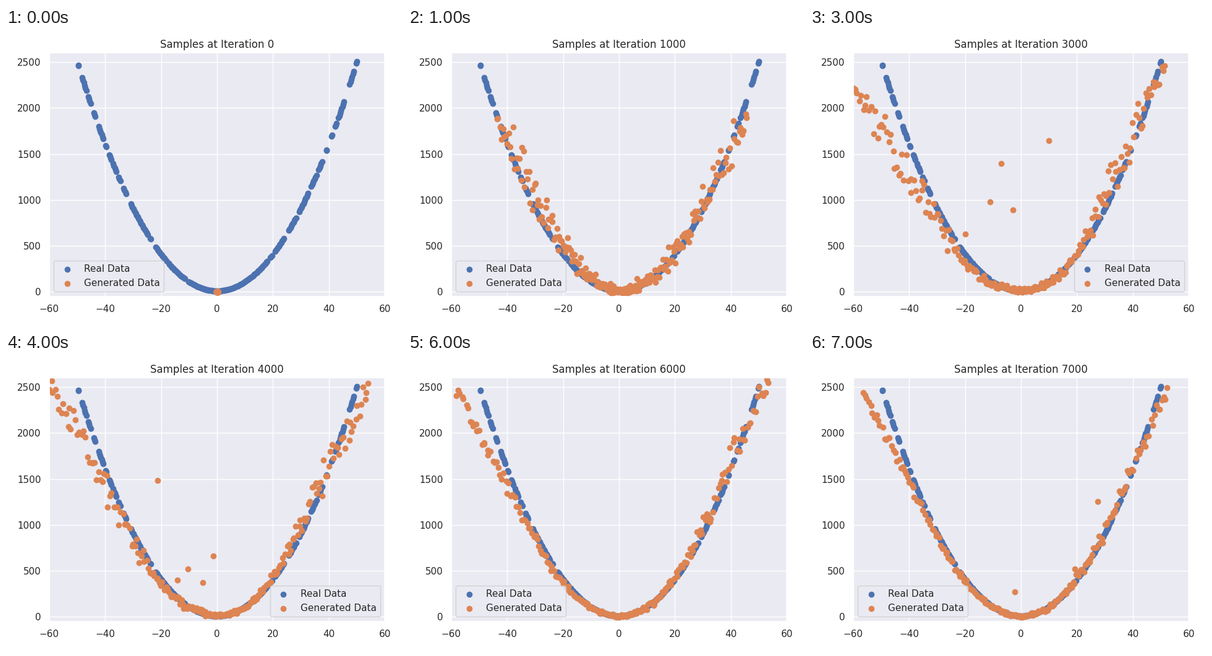
A matplotlib script that plays this animation: 640 by 480 pixels, repeating every 8 s.

```python
import numpy as np
import matplotlib.pyplot as plt
from matplotlib.animation import FuncAnimation

BLUE, ORANGE, PANEL, INK = "#4C72B0", "#DD8452", "#EAEAF2", "#262626"

plt.rcParams.update({
    "font.family": "DejaVu Sans", "font.size": 12, "text.color": INK,
    "axes.titlesize": 12, "axes.facecolor": PANEL, "axes.edgecolor": "white",
    "axes.linewidth": 1.25, "axes.axisbelow": True, "grid.color": "white",
    "grid.linewidth": 1, "legend.fontsize": 11,
    "xtick.labelsize": 11, "ytick.labelsize": 11,
    "xtick.labelcolor": INK, "ytick.labelcolor": INK,
    "xtick.major.size": 6, "ytick.major.size": 6,
    "xtick.bottom": False, "ytick.left": False,
})

# Start and end of each unbroken stretch of real samples
LEFT_RUNS = [
    (-49.6, -49.5), (-48.2, -46.7), (-46, -45.2), (-44, -43.6),
    (-42.3, -40.7), (-39.8, -39.6), (-38.5, -37.8), (-37.2, -36),
    (-35.2, -34.6), (-33.4, -32.5), (-30.8, -24.7), (-23.9, -23.7),
    (-21.8, -18.2), (-17.3, -11.5), (-10.1, 0),
]
RIGHT_RUNS = [
    (0.7, 18), (19, 19.6), (20.8, 23.9), (25.7, 28.2), (29.4, 32.6),
    (33.7, 35.5), (36.3, 37.5), (39.1, 39.2), (41, 41.2), (42.3, 42.7),
    (43.4, 45.4), (47.4, 48.9), (49.8, 50),
]


def fill(lo, hi):
    return np.linspace(lo, hi, 2 + int(3.2 * (hi - lo)))


def cloud(seed, span, height, spread, strays=(), n=110):
    """Noisy curve through heights at even x steps, plus stray points."""
    rng = np.random.default_rng(seed)
    u = (np.arange(n) + rng.random(n)) / n
    x = np.concatenate([end * u ** 1.35 for end in span])
    root = np.interp(x, np.linspace(-60, 60, len(height)), np.sqrt(height))
    width = np.interp(x, np.linspace(-60, 60, len(spread)), spread)
    y = root ** 2 + width * rng.normal(0, 1, 2 * n).clip(-1.8, 1.8)
    return np.vstack([np.column_stack([x, y]), *strays])


start = np.random.default_rng(4).uniform([-0.35, -3], [0.35, 3], (40, 2))

early = cloud(
    1, (-43.9, 46),
    [3000, 2400, 1700, 1050, 520, 160, 10, 130, 450, 950, 1600, 2300, 3000],
    [150, 150, 80, 20, 80, 150, 150])

wide = cloud(
    2, (-59, 58),
    [2640, 2100, 1680, 1050, 520, 170, 5, 115, 375, 980, 1480, 1980, 2500],
    [50, 120, 100, 14, 40, 130, 50],
    [(-3.9, 1415), (-10.4, 1140), (1.6, 1165), (-30.7, 1760), (33, 1665)])

skewed = cloud(
    3, (-60.5, 51.8),
    [2230, 1800, 1200, 760, 330, 70, 15, 85, 395, 1080, 1730, 2470, 3100],
    [80, 150, 35, 10, 40, 140, 60],
    [(-11, 980), (-7.1, 1400), (-2.9, 890), (10, 1645), (-20, 630)])

closer = cloud(
    4, (-60.4, 54.5),
    [2530, 2060, 1430, 810, 360, 100, 10, 90, 440, 1000, 1680, 2230, 2900],
    [60, 100, 35, 8, 25, 110, 70],
    [(-21.2, 1485), (-1.4, 660), (-10.3, 520), (-5, 370), (-14.1, 400)])

tight = [2460, 1930, 1320, 810, 350, 85, 8, 95, 445, 1040, 1800, 2400, 3000]
tight_cloud = cloud(
    5, (-60, 52.4), tight, [30, 80, 15, 6, 25, 140, 60],
    [(-4.6, 1215), (19.5, 1400), (27.3, 1450), (-6.3, 125), (30.6, 1590)])

final = [2690, 2080, 1470, 880, 390, 105, 5, 105, 430, 930, 1660, 2330, 3000]
final_cloud = cloud(
    7, (-56.8, 52.5), final, [25, 35, 18, 6, 25, 65, 50],
    [(-2.2, 275), (27.5, 1255), (19.3, 520)])

late = cloud(6, (-58.7, 53.9), np.mean([tight, final], axis=0),
             [30, 55, 17, 6, 25, 90, 55])

CLOUDS = [start, early, wide, skewed, closer, tight_cloud, late, final_cloud]

fig, ax = plt.subplots(figsize=(6.4, 4.8), dpi=100)
ax.set(xlim=(-60, 60), ylim=(-50, 2600), title="Samples at Iteration 0",
       xticks=range(-60, 61, 20), yticks=range(0, 2501, 500))
ax.grid(True)
fig.tight_layout()

real_x = np.concatenate([fill(*run) for run in LEFT_RUNS + RIGHT_RUNS])
ax.scatter(real_x, real_x ** 2 + 10, color=BLUE, label="Real Data")
fake = ax.scatter(*start.T, color=ORANGE, label="Generated Data")


def draw(i):
    fake.set_offsets(CLOUDS[i])
    ax.set_title(f"Samples at Iteration {i * 1000}")
    ax.legend(loc="lower right" if i in (3, 4) else "lower left")
    return []


anim = FuncAnimation(fig, draw, frames=len(CLOUDS), init_func=lambda: [],
                     interval=1000, repeat=True, repeat_delay=0)
plt.show()
```
